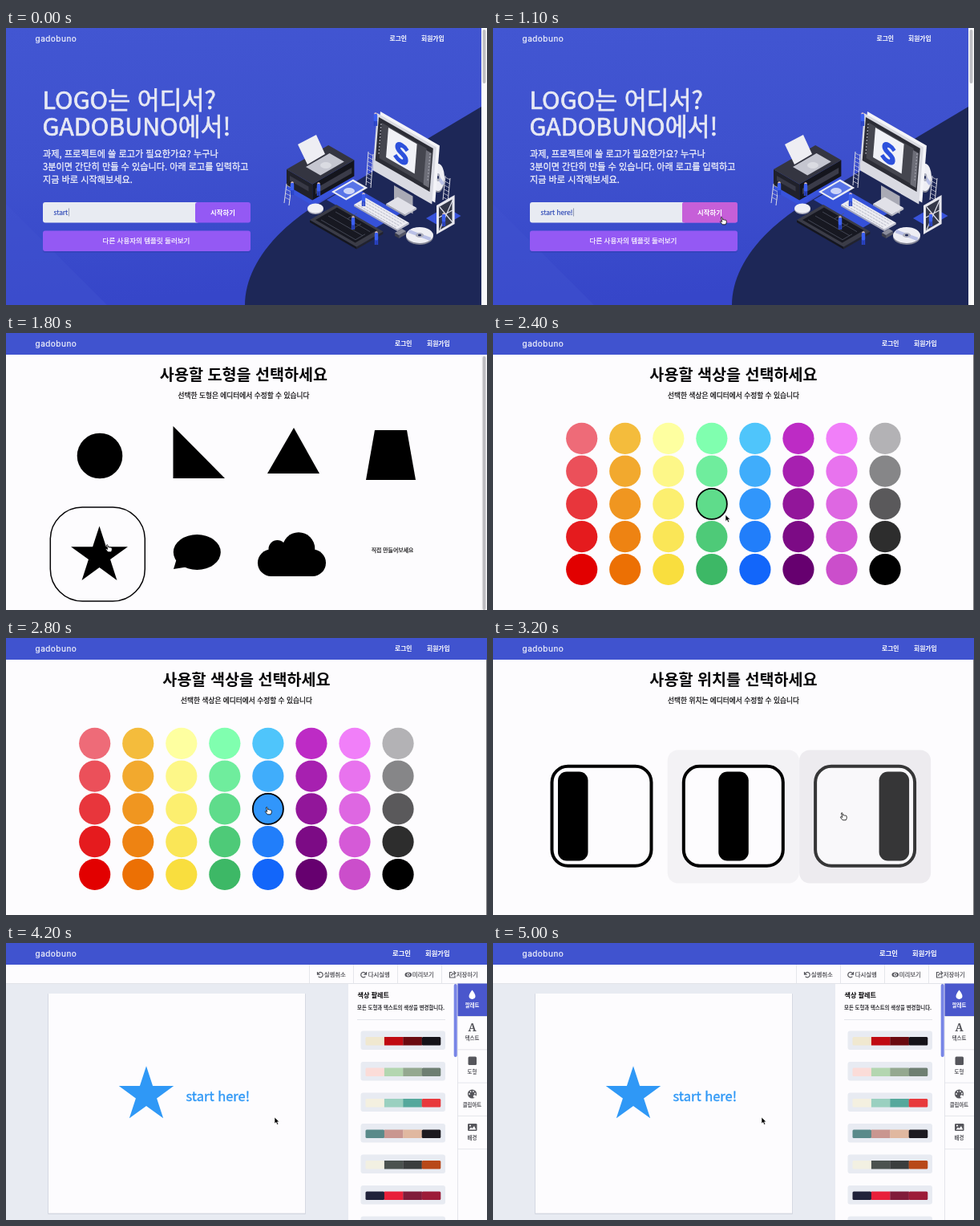
Write an HTML page that moves like this. It is 600 px wide and 345 px high and loops after 5.1 s.

```html
<!DOCTYPE html>
<html lang="ko">
<head>
<meta charset="utf-8">
<title>Logo maker walkthrough</title>
<style>
html, body { margin: 0; width: 100%; height: 100%; overflow: hidden; background: #fdfcfe; }
svg { display: block; width: 600px; height: 345px; font-family: "Noto Sans CJK KR", "Noto Sans CJK", "Noto Sans", sans-serif; }
text { white-space: pre; }
</style>
</head>
<body>
<svg id="stage" viewBox="0 0 600 345" xmlns="http://www.w3.org/2000/svg"></svg>
<script>
const LOOP = 5100, STEP = 100;
const BLUE = '#4053cf', PAPER = '#fdfcfe', MIST = '#e8ebf2', INK = '#060507', GREY = '#56565c', RULE = '#dfe0e6';
const stage = document.getElementById('stage');

const repeat = (n, draw) => Array.from({ length: n }, (_, i) => draw(i)).join('');
// Medium weight is drawn as regular with a thin outline.
const text = (x, y, size, str, fill = INK, weight = 500, anchor = 'start', extra = '') =>
  `<text x="${x}" y="${y}" font-size="${size}" fill="${fill}" font-weight="${weight > 500 ? 700 : 400}" text-anchor="${anchor}"
    ${weight === 500 ? `stroke="${fill}" stroke-width="${size * 0.024}"` : ''} ${extra}>${str}</text>`;
const rect = (x, y, w, h, fill, rx = 0, extra = '') =>
  `<rect x="${x}" y="${y}" width="${w}" height="${h}" rx="${rx}" fill="${fill}" ${extra}/>`;
const poly = (points, fill) => `<polygon points="${points}" fill="${fill}"/>`;
const disc = (x, y, rx, fill, ry = rx, extra = '') =>
  `<ellipse cx="${x}" cy="${y}" rx="${rx}" ry="${ry}" fill="${fill}" ${extra}/>`;
const line = (d, stroke, width = 1, extra = '') =>
  `<path d="${d}" fill="none" stroke="${stroke}" stroke-width="${width}" ${extra}/>`;
const scene = (id, content) => `<g id="${id}" display="none">${content}</g>`;

const star = (cx, cy, r, fill) => poly(Array.from({ length: 10 }, (_, i) => {
  const a = i * Math.PI / 5, q = i % 2 ? r * 0.382 : r;
  return [cx + q * Math.sin(a), cy - q * Math.cos(a)];
}).join(' '), fill);

const brand = text(36.5, 17, 10, 'gadobuno', '#eef0fb', 500, 'start', 'font-family="Inter, sans-serif" letter-spacing=".5"');
const nav = (x1, x2, size = 7.8) =>
  brand + text(x1, 16.3, size, '로그인', '#fff', 700) + text(x2, 16.3, size, '회원가입', '#fff', 700);
const page = (noun, particles, cx) => rect(0, 0, 600, 345, PAPER) + rect(0, 0, 600, 27, BLUE) + nav(485, 525) +
  text(cx, 59.3, 19.6, `사용할 ${noun + particles[0]} 선택하세요`, INK, 700, 'middle') +
  text(cx, 81, 8.7, `선택한 ${noun + particles[1]} 에디터에서 수정할 수 있습니다`, INK, 500, 'middle');
const edge = rect(599, 27, 1, 318, '#77757a');

// Isometric drawing: u runs right and down, v runs right and up.
const iso = (x, y, u, v) => [x + 0.87 * (u + v), y + 0.5 * (u - v)];
const floor = (x, y, u, v, fill) =>
  poly([iso(x, y, 0, 0), iso(x, y, u, 0), iso(x, y, u, v), iso(x, y, 0, v)].join(' '), fill);
const wall = (x, y, u, v, h, fill, lean = 0) => {
  const [x2, y2] = iso(x, y, u, v);
  return poly([[x, y], [x2, y2], [x2 - lean * h, y2 + h], [x - lean * h, y + h]].join(' '), fill);
};
const slab = (x, y, u, v, h, top, left, right) =>
  wall(x, y, u, 0, h, left) + wall(...iso(x, y, u, 0), 0, v, h, right) + floor(x, y, u, v, top);
const screen = (x, y, u, h, fill) => wall(x, y, u, 0, h, fill, 0.08);
const ladder = (x, y, h) => line(`M${x} ${y}l-3 ${h}m6 3l3-${h}`, '#dcdce6') +
  repeat(h / 5, i => line(`M${x - i * 15 / h} ${y + 2 + i * 5}l6 3`, '#c9cad6', 0.8));
const person = (x, y) => disc(x, y - 6, 1.8, '#e9c9c4') +
  line(`M${x} ${y - 4}v6`, '#3b5ff0', 4.5, 'stroke-linecap="round"') +
  line(`M${x - 1.2} ${y + 3}v6m2.4 0v-6`, '#2a45c8', 2);
const cd = (x, y, rx, ry) => disc(x, y + 2, rx, '#858796', ry) + disc(x, y, rx, '#eeeef4', ry) +
  line(`M${x - rx * 0.8} ${y - ry * 0.5}L${x + rx * 0.8} ${y + ry * 0.5}`, '#b9c0e6', 4) +
  disc(x, y, rx * 0.3, '#aeb0be', ry * 0.3) + disc(x, y, rx * 0.12, '#1d2757', ry * 0.12);

const platforms = floor(346, 200, 42, 62, '#3853dc') + floor(400, 214, 70, 36, '#3551d8') + floor(524, 237, 22, 28, '#3853dc');
const printer = slab(350, 176, 37, 60, 20, '#343541', '#20212b', '#14151d') +
  floor(374, 173, 21, 34, '#c5c6d0') + disc(399, 171, 7, '#dadbe2', 4) +
  wall(386, 200, 0, 52, 7, '#3a3b48') + wall(354, 184, 27, 0, 6, '#383946') +
  poly('364,145 387,133 398,157 376,170', '#eeeef3') +
  floor(406, 204, 21, 31, '#ecedf4') + floor(410, 204, 16, 26, '#5874e8') + disc(428, 203, 7, '#cdd5f8', 4);
const monitor = cd(539, 186, 8, 17) + ladder(548, 184, 30) +
  wall(484, 196, 27, 0, 22, '#a9aab5') + slab(474, 219, 27, 17, 2, '#e1e1e8', '#a5a6b1', '#c0c1ca') +
  screen(467, 104, 85, 71, '#f4f4f8') + screen(463, 106, 85, 71, '#d9dae2') +
  screen(465, 111, 78, 54, '#2c2d36') + screen(469, 118, 64, 44, '#45464f') +
  screen(477, 124, 41, 37, '#f1f2f7') + screen(524, 152, 8, 43, '#6d6e78') +
  line('M468 119l-3 38M529 156l-3 34', '#9a9ba5', 1.4, 'stroke-dasharray="2 2"') +
  `<g transform="matrix(.95 .52 -.08 1 484 163)">${text(-1, 0, 31, 'S', '#2d51dc', 700, 'start', 'stroke="#2d51dc" stroke-width="2"')}</g>`;
const desk = slab(434, 220, 62, 17, 2, '#ececf2', '#a8a9b8', '#c4c5d0') +
  repeat(4, i => line(`M${439 + i * 3.5} ${220.5 - i * 2}l48 27.6`, '#b8bac8', 1, 'stroke-dasharray="3 1"')) +
  slab(379, 239, 67, 38, 3, '#3b3c47', '#15161e', '#22232d') + floor(386, 239, 57, 31, '#171821') +
  repeat(3, i => line(`M${393 + i * 9} ${239 - i * 5}l43 24.7m-${i * 14} -${i * 8}l12-7`, '#555969', 0.7)) +
  disc(386, 226, 10, '#a8a9b8', 6) + disc(386, 224.5, 10, '#f0f0f5', 6) + cd(516, 258, 17, 10) +
  slab(485, 255, 6, 10, 4, '#8b8d9b', '#3a3c4b', '#555766') +
  wall(537, 221, 0, 26, 36, '#e7e7ee') + wall(540, 223, 0, 19, 29, '#333748') +
  line('M541 223l16 19m0-27l-16 36m-1-15l17-9', '#dfe0ea', 1.2);
const workers = [[461, 113], [357, 199], [390, 200], [446, 213], [433, 242], [462, 261], [546, 238]];
const workshop = platforms + printer + monitor + desk + ladder(452, 154, 42) + ladder(350, 194, 24) +
  workers.map(p => person(...p)).join('');

const hero = scene('hero',
  rect(0, 0, 593, 345, 'url(#sky)') + poly('0,219 126,345 0,345', 'rgba(64,83,207,.5)') +
  `<path d="M298 345C298 305 325 262 378 226L593 98V345Z" fill="#1d2757"/>` + workshop +
  rect(593, 0, 7, 345, '#fafafb') + rect(594.5, 2, 4, 67, '#bfbfc3', 2) + nav(478.5, 518) +
  ['LOGO는 어디서?', 'GADOBUNO에서!'].map((s, i) => text(45.5, 101 + i * 33, 30.4, s, '#e7e9f4')).join('') +
  ['과제, 프로젝트에 쓸 로고가 필요한가요? 누구나', '3분이면 간단히 만들 수 있습니다. 아래 로고를 입력하고', '지금 바로 시작해보세요.']
    .map((s, i) => text(46, 161.3 + i * 15.8, 11.15, s, '#f0f1fa')).join('') +
  rect(46, 217, 195, 25.5, MIST, 3) + rect(236, 217, 69, 25.5, '#9459f4', 3) + rect(236, 217, 69, 25.5, '#c65fd8', 3, 'id="warm"') +
  text(270.5, 232.7, 8.4, '시작하기', '#fff', 700, 'middle') +
  rect(46, 254, 259, 26, '#2c3aa6', 3, 'opacity=".35"') + rect(46, 252.5, 259, 25.5, '#9459f4', 3) +
  text(175, 268, 8.5, '다른 사용자의 템플릿 둘러보기', '#fff', 500, 'middle') +
  text(59.5, 232.5, 8.3, '', '#2c47b5', 500, 'start', 'id="typed"') + rect(0, 224.5, 0.7, 10, '#6a7390', 0, 'id="caret"'));

// Shape chooser
const cell = { x: 116, y: 153, w: 121.5, h: 122.5 };
const shapes = scene('shapes',
  page('도형', '을은', 296.5) + rect(593, 27, 7, 318, '#f7f6f8') + rect(594.5, 29, 4, 316, '#bdbcc0', 2) +
  rect(0, 0, 118, 117, PAPER, 40, `id="shapeRing" stroke="${INK}" stroke-width="1.5"`) +
  disc(117, 153, 28.3, '#000') + poly('208.5,116 208.5,181 273,181', '#000') +
  poly('359,118 391,175 326,175', '#000') + poly('460,121 500,121 511,183 449,183', '#000') +
  star(116.5, 277.7, 37.3, '#000') +
  disc(238.3, 273, 29.5, '#000', 22) + poly('213,281 209,294 228,291', '#000') +
  rect(314, 269.5, 85, 33.5, '#000', 16.7) + disc(365, 268.5, 20.3, '#000') + disc(338.5, 269, 11, '#000') +
  rect(338, 268, 35, 14, '#000') + text(482, 273, 6.9, '직접 만들어보세요', INK, 500, 'middle'));

// Colour chooser: each column blends from a light to a deep tone
const tones = ['#ee6b78 #e20000', '#f4bc3c #ec7004', '#feffa0 #f9de3e', '#80ffaf #3db866',
  '#4fc5fb #1266fa', '#bd2bc5 #66006f', '#f17ff9 #cb4ecb', '#b3b2b5 #000000'].map(s => s.split(' '));
const dot = { x: 110.7, y: 131.3, w: 54.05, h: 40.8 };
const colors = scene('colors', page('색상', '을은', 300) + edge +
  tones.map(([light, deep], i) => repeat(5, j =>
    disc(dot.x + i * dot.w, dot.y + j * dot.h, 19.6, `color-mix(in srgb, ${deep} ${j * 25}%, ${light})`))).join('') +
  disc(0, 0, 19, 'none', 19, `id="dotRing" stroke="${INK}" stroke-width="1.8"`));

// Position chooser
const places = scene('places', page('위치', '를는', 300) + edge + repeat(3, i => {
  const x = 53.5 + i * 164.3;
  return rect(x, 139.5, 164, 166, '#e3e2e6', 13, `id="glow${i}"`) +
    `<g id="card${i}">` + rect(x + 20, 159.7, 124, 124, PAPER, 20, 'stroke="#000" stroke-width="4"') +
    rect(x + 27.5 + i * 36, 166.5, 37.5, 111, '#000', 11) + '</g>';
}));

// Editor
const swatches = ['#f0e8d0 #c00a12 #6a0a10 #141218', '#fbdcd8 #b3d6b0 #94a890 #6e7f72', '#f4f0e0 #9ad0c0 #55a89c #e8393c',
  '#5a8a8a #c99690 #e0b8a0 #1c1a20', '#f2f0e2 #4b524f #3a3d3d #b84818', '#20223a #e8203a #801c3a #9c1c38'].map(s => s.split(' '));
const turn = 'M388.5 36v3.2h3.2M389 38.7a3.2 3.2 0 1 1 .6 3';
const toolIcons = line(turn, GREY, 1.2) + line(turn, GREY, 1.2, 'transform="matrix(-1 0 0 1 838 0)"') +
  disc(501.8, 39.5, 4.3, GREY, 3) + disc(501.8, 39.5, 2, PAPER) + disc(501.8, 39.5, 1, GREY) +
  line('M556.5 36.5h-3v6.5h6.5v-2.5M555.8 41q0-3.5 4-3.5M558.5 35.2l2.3 2.3-2.3 2.3', GREY, 1.2);
const tabIcons = '<path d="M581.5 58.5q8 10 0 11.5q-8-1.5 0-11.5z" fill="#fff"/>' +
  text(581.5, 110, 13.5, 'A', GREY, 700, 'middle', 'font-family="Noto Serif, serif"') + rect(576.5, 141.5, 10.5, 10.5, GREY, 1.5) +
  disc(581.5, 188, 5.6, GREY) + disc(584.5, 191, 1.8, PAPER) +
  repeat(4, i => disc(581.5 - 3.5 * Math.cos(i), 188 - 3.5 * Math.sin(i), 0.9, PAPER)) +
  rect(576, 225, 11.5, 9, GREY, 1.3) + poly('577.5,232.5 580,229.5 581.5,231 584,228 586.3,232.5', PAPER) + disc(579, 227.5, 1, PAPER);
const editor = scene('editor',
  rect(0, 0, 600, 345, MIST) + rect(0, 0, 600, 27, BLUE) + nav(482, 523, 8.3) + rect(0, 27, 600, 23.5, PAPER) +
  line('M0 50.5H600', RULE, 0.8) + toolIcons +
  ['실행취소', '다시실행', '미리보기', '저장하기'].map((s, i) =>
    line(`M${378.5 + i * 55} 27v23`, RULE, 0.8) + text(396.7 + i * 55, 42, 7.4, s, '#44444a')).join('') +
  rect(52, 63, 322, 275, '#d5d8e2', 1) + rect(53, 63, 320, 273.5, PAPER) +
  star(175, 189.2, 36, '#2f98f6') + text(224.5, 196.5, 16.5, 'start here!', '#2f98f6') +
  rect(427, 51, 136.5, 294, PAPER) + text(438.5, 68, 8.1, '색상 팔레트', INK, 700) +
  text(438, 83, 6.4, '모든 도형과 텍스트의 색상을 변경합니다.', '#29292e', 700) + line('M438 95.5H548', RULE, 0.8) +
  repeat(7, i => {
    const y = 109.5 + i * 38.5;
    return rect(442.5, y, 105.5, 23.5, MIST, 3) +
      swatches[i % 6].map((c, k) => rect(448.5 + k * 23.4, y + 7.5, 23.6, 10.5, c, k % 3 ? 0 : 1.5)).join('');
  }) +
  rect(558.7, 51, 4, 91, '#7885e6', 2) + rect(563.5, 51, 36.5, 294, PAPER) + line('M563.5 51V345', RULE, 0.8) +
  rect(563.5, 50.5, 36.5, 40.5, '#4a57cc') + tabIcons +
  ['팔레트', '텍스트', '도형', '클립아트', '배경'].map((s, i) => line(`M563.5 ${91.5 + i * 41.3}H600`, RULE, 0.8) +
    text(581.5, 80 + i * 41.3, 6.4, s, i ? GREY : '#fff', 700, 'middle')).join(''));

const cursor = `<g id="cursor">
  <path id="arrow" d="M0-3v8l1.9-1.7 1.3 3 1.5-.7-1.3-2.8h2.5z" fill="#000" stroke="#fff" stroke-width=".6"/>
  <path id="hand" d="M-2.5-4q.9-.8 1.5.3l.9 2.7q1-.8 1.5.1q1-.6 1.5.3q1.3-.3 1.3 1.2v2l-1 2.2h-4l-2.7-3.2q-.4-1.4 1.2-.7l1 .5z" fill="#fff" stroke="#000" stroke-width=".8"/></g>`;

stage.innerHTML = `<defs><linearGradient id="sky" x2=".15" y2="1">
  <stop stop-color="#4256d2"/><stop offset=".5" stop-color="#3e51ce"/><stop offset="1" stop-color="#3646c9"/></linearGradient></defs>` +
  hero + shapes + colors + places + editor + cursor;

const el = {};
stage.querySelectorAll('[id]').forEach(n => el[n.id] = n);
const set = (node, attrs) => Object.entries(attrs).forEach(([k, v]) => node.setAttribute(k, v));
const show = (node, on) => node.setAttribute('display', on ? 'inline' : 'none');
const ramp = (t, from, span) => Math.min(1, Math.max(0, (t - from) / span));
const ease = k => k * k * (3 - 2 * k);
const nearest = (grid, x, y) => [grid.x + grid.w * Math.round((x - grid.x) / grid.w), grid.y + grid.h * Math.round((y - grid.y) / grid.h)];

// Arrival time and place of each pointer stop
const TRAVEL = 300;
const stops = [[1000, 287, 240], [1700, 128, 268], [2400, 290, 229.5], [2700, 327, 215], [3200, 437, 222], [3700, 335, 220]];
const pointer = t => stops.reduce(([x, y], [arrive, sx, sy]) => {
  const k = ease(ramp(t, arrive - TRAVEL, TRAVEL));
  return [x + (sx - x) * k, y + (sy - y) * k];
}, [215, 250]);

// Each scene updates itself and tells whether the pointer is over a target.
const update = {
  hero(t) {
    el.typed.textContent = 'start here!'.slice(0, 5 + t / 100);
    el.caret.setAttribute('x', 60.3 + el.typed.getComputedTextLength());
    el.warm.setAttribute('opacity', ramp(t, 900, 200));
    return t >= 1000;
  },
  shapes(t, x, y) {
    const [cx, cy] = nearest(cell, x, y);
    set(el.shapeRing, { x: cx - 60.7, y: cy - 58.5 });
    return true;
  },
  colors(t, x, y) {
    const [cx, cy] = nearest(dot, x, y), gap = Math.hypot(x - cx, y - cy);
    show(el.dotRing, gap < 24 && x > 88);
    set(el.dotRing, { cx, cy });
    return gap < 19.6;
  },
  places(t, x) {
    const right = ramp(t, 3050, 250) - ramp(t, 3550, 250);
    [0, 1 - right, right].forEach((level, i) => {
      el['glow' + i].setAttribute('opacity', level);
      el['card' + i].setAttribute('opacity', i === (x > 382 ? 2 : 1) ? 0.77 : 1);
    });
    return true;
  },
  editor: () => false
};
const starts = { hero: 0, shapes: 1200, colors: 2200, places: 2900, editor: 4200 };

function render(ms) {
  const t = Math.floor((ms % LOOP) / STEP) * STEP;
  const current = Object.keys(starts).filter(id => starts[id] <= t).pop();
  Object.keys(starts).forEach(id => show(el[id], id === current));
  const [x, y] = pointer(t), over = update[current](t, x, y);
  show(el.cursor, t >= 800);
  el.cursor.setAttribute('transform', `translate(${x} ${y})`);
  show(el.hand, over);
  show(el.arrow, !over);
}

const began = performance.now();
function tick() {
  render(performance.now() - began);
  requestAnimationFrame(tick);
}
tick();
</script>
</body>
</html>
```
